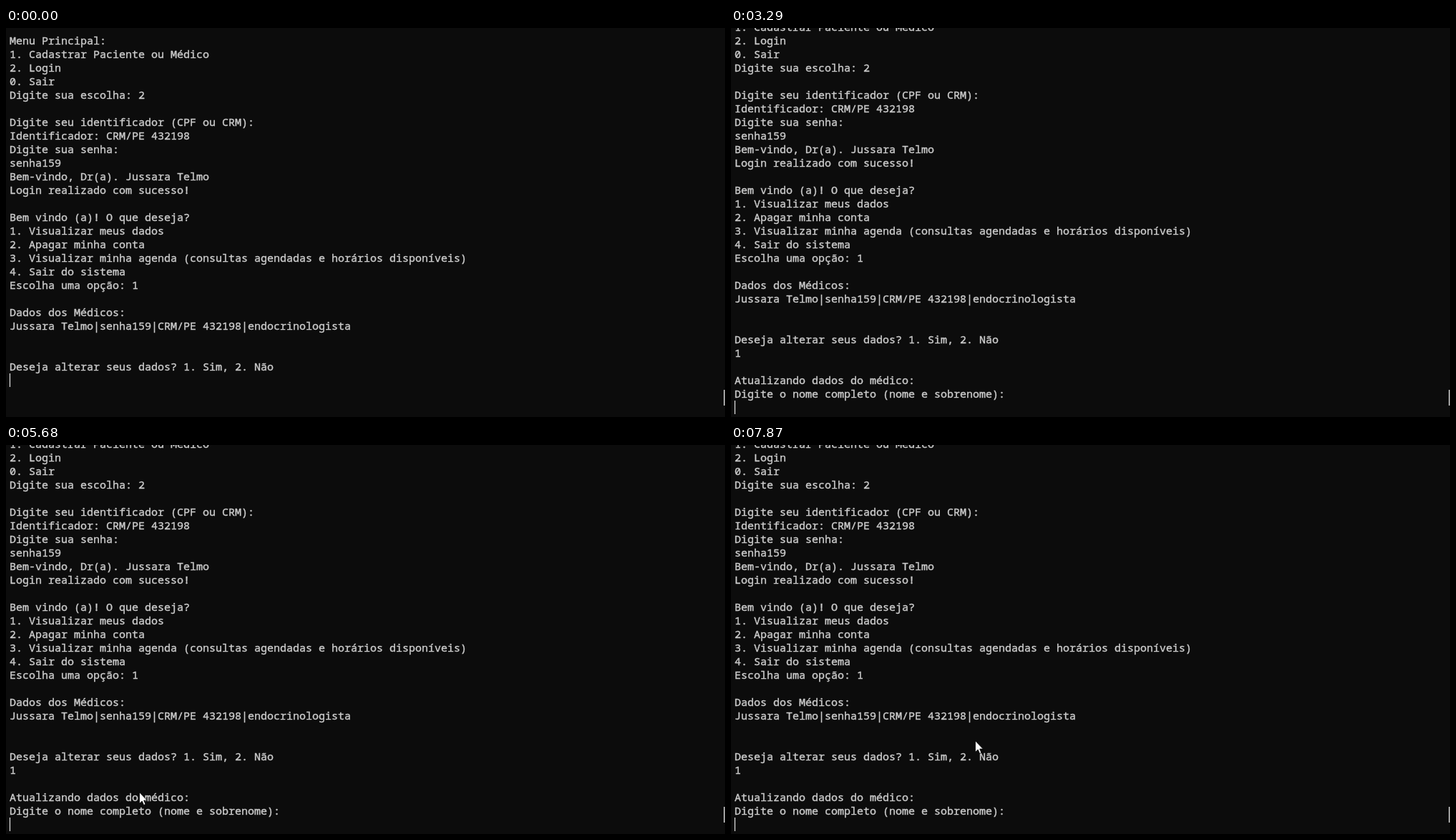
Recreate the animation shown at these times as an HTML page. Size 1005 by 544 pixels, loop 8000 ms.

```html
<!DOCTYPE html>
<html lang="pt-BR">
<head>
<meta charset="utf-8">
<style>
  html, body { margin: 0; width: 100%; height: 100%; overflow: hidden; background: #0c0c0c; }
  pre, #caret, #thumb, #mouse { position: absolute; margin: 0; }
  pre { left: 5px; font: 15px/19px "Noto Sans Mono", monospace; color: #ccc; -webkit-text-stroke: .4px #ccc; }
  #caret { width: 1px; height: 19px; background: #fff; }
  #thumb { left: 1003px; top: 506px; width: 2px; height: 22px; background: #9f9f9f; }
  #mouse { left: 0; top: 0; width: 12px; height: 19px; overflow: visible; }
</style>
</head>
<body>
<pre id="screen"></pre>
<div id="caret"></div>
<div id="thumb"></div>
<svg id="mouse"><path d="M.5 .7V16.5L4.2 13L6.6 18.5L9 17.5L6.7 12.1H11.4Z" fill="#fff" stroke="#000" stroke-width=".8"/></svg>
<script>
const LOOP = 8000, LINE = 19, CHAR = 9, TOP = 8, LEFT = 5;
const TYPED = 1950, SUBMITTED = 3290;
const BLINK = 555, STEP = 130;

const menu = `Menu Principal:
1. Cadastrar Paciente ou Médico
2. Login
0. Sair
Digite sua escolha: 2

Digite seu identificador (CPF ou CRM):
Identificador: CRM/PE 432198
Digite sua senha:
senha159
Bem-vindo, Dr(a). Jussara Telmo
Login realizado com sucesso!

Bem vindo (a)! O que deseja?
1. Visualizar meus dados
2. Apagar minha conta
3. Visualizar minha agenda (consultas agendadas e horários disponíveis)
4. Sair do sistema
Escolha uma opção: 1

Dados dos Médicos:
Jussara Telmo|senha159|CRM/PE 432198|endocrinologista


Deseja alterar seus dados? 1. Sim, 2. Não
`;
const update = `

Atualizando dados do médico:
Digite o nome completo (nome e sobrenome):
`;

// Pointer sweeps: key points as [step, x, y], visible until one step after the last
const sweeps = [
  { start: 4500, path: [[0, 290, 448], [4, 245, 427], [7, 172, 504], [9, 186, 485], [12, 166, 471], [14, 138, 421], [16, 10, 455]] },
  { start: 7590, path: [[0, 170, 210], [2, 341, 413]] }
];

const [screenEl, caret, mouse] = ["screen", "caret", "mouse"].map(id => document.getElementById(id));
const place = (el, x, y) => { el.style.transform = `translate(${x}px, ${y}px)`; };

// The blink restarts on input, and a keystroke holds the caret solid
function caretOn(t) {
  if (t >= TYPED && t < TYPED + BLINK) return true;
  const epoch = t < TYPED ? -165 : SUBMITTED;
  return Math.floor((t - epoch) / BLINK) % 2 === 0;
}

// The pointer follows its path in discrete steps
function pointerAt(t) {
  for (const { start, path } of sweeps) {
    const step = Math.floor((t - start) / STEP);
    if (step < 0 || step > path.at(-1)[0]) continue;
    const i = Math.max(1, path.findIndex(p => p[0] >= step));
    const [a, x0, y0] = path[i - 1], [b, x1, y1] = path[i];
    const u = (step - a) / (b - a);
    return [x0 + (x1 - x0) * u, y0 + (y1 - y0) * u].map(Math.round);
  }
}

function draw(t) {
  const text = menu + (t >= TYPED ? "1" : "") + (t >= SUBMITTED ? update : "");
  if (screenEl.textContent !== text) screenEl.textContent = text;

  const top = TOP - (t >= SUBMITTED ? 2 * LINE : 0);
  place(screenEl, 0, top);

  const lines = text.split("\n");
  place(caret, LEFT + CHAR * lines.at(-1).length, top + LINE * (lines.length - 1));
  caret.hidden = !caretOn(t);

  const pos = pointerAt(t);
  mouse.style.display = pos ? "block" : "none";
  if (pos) place(mouse, ...pos);
}

const start = performance.now();
function tick() {
  draw((performance.now() - start) % LOOP);
  requestAnimationFrame(tick);
}
tick();
</script>
</body>
</html>
```
